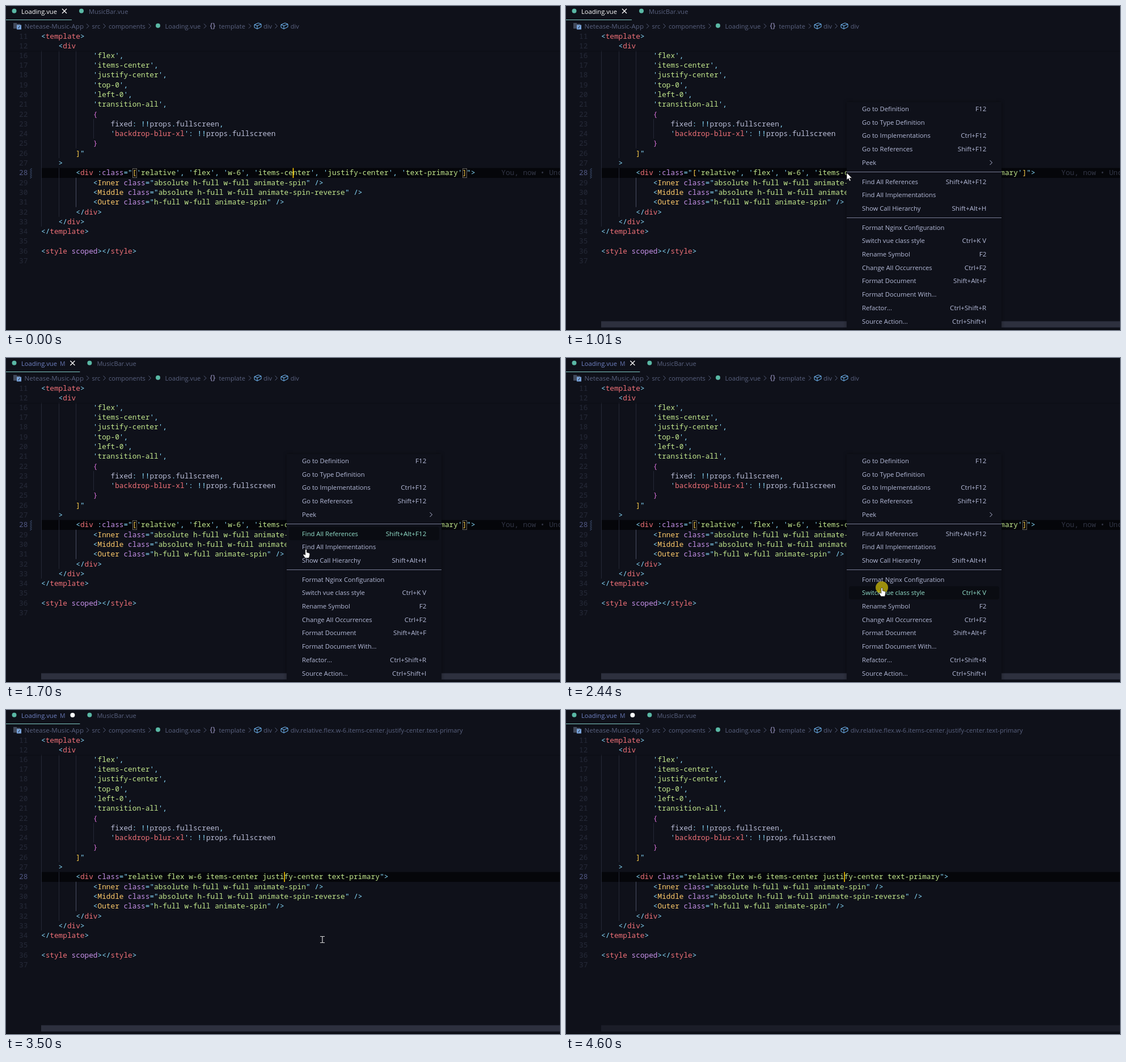
These frames come from a looping animation (977 px wide and 573 px high, 4.66 s). An HTML page with a canvas:

```html
<!DOCTYPE html>
<html lang="en">
<head>
<meta charset="utf-8">
<title>Editor: switch class style</title>
<style>
html, body { margin: 0; width: 100%; height: 100%; overflow: hidden; background: #0f111a; }
canvas { display: block; }
</style>
</head>
<body>
<canvas id="stage" width="977" height="573"></canvas>
<script>
const LOOP = 4660, BG = '#0f111a', CHAR = 7.656, LEFT = 62;
const MONO = '500 12.76px "Noto Sans Mono", "DejaVu Sans Mono", monospace';
const ui = size => `${size}px "Open Sans", "Noto Sans", sans-serif`;
const c = document.getElementById('stage').getContext('2d');

// Key times in ms
const T = { enter: 70, blur: 270, menu: 860, focus: 1220, click: 2430, close: 2500, edit: 2570, dirty: 2640, crumb: 2830 };

// Each piece of a code line starts with a colour key
const INK = { c: '#89ddff', r: '#f07178', p: '#c792ea', g: '#c3e88d', y: '#ffcb6b', w: '#babed8', o: '#ffd04a', m: '#d670d6' };
const quoted = s => `c'~g${s}~c'`;
const item = s => quoted(s) + '~c,';
const tag = (name, cls) => `c<~y${name} ~pclass~c="~g${cls}~c" />`;
const classes = ['relative', 'flex', 'w-6', 'items-center', 'justify-center', 'text-primary'];
const bound = `c<~rdiv ~c:~pclass~c="~o[~${classes.map(quoted).join('~c, ~')}~o]~c">`;
const plain = `c<~rdiv ~pclass~c="~g${classes.join(' ')}~c">`;
const code = [
  [11, 0, 'c<~rtemplate~c>'], [12, 4, 'c<~rdiv'],
  ...['flex', 'items-center', 'justify-center', 'top-0', 'left-0', 'transition-all'].map((s, i) => [16 + i, 12, item(s)]),
  [22, 12, 'm{'],
  [23, 16, 'wfixed~c: !!~wprops~c.~wfullscreen~c,'],
  [24, 16, "c'~rbackdrop-blur-xl~c'~c: !!~wprops~c.~wfullscreen"],
  [25, 12, 'm}'], [26, 8, 'o]~c"'], [27, 4, 'c>'], [28, 8, bound],
  [29, 12, tag('Inner', 'absolute h-full w-full animate-spin')],
  [30, 12, tag('Middle', 'absolute h-full w-full animate-spin-reverse')],
  [31, 12, tag('Outer', 'h-full w-full animate-spin')],
  [32, 8, 'c</~rdiv~c>'], [33, 4, 'c</~rdiv~c>'], [34, 0, 'c</~rtemplate~c>'],
  [35, 0, ''], [36, 0, 'c<~rstyle ~pscoped~c></~rstyle~c>'], [37, 0, '']
];
const lineY = n => n < 13 ? 53.6 + 17.3 * (n - 11) : 87.4 + 17.3 * (n - 16);
const colX = n => LEFT + n * CHAR;

const menu = [
  'Go to Definition|F12', 'Go to Type Definition|', 'Go to Implementations|Ctrl+F12', 'Go to References|Shift+F12', 'Peek|',
  'Find All References|Shift+Alt+F12', 'Find All Implementations|', 'Show Call Hierarchy|Shift+Alt+H',
  'Format Nginx Configuration|', 'Switch vue class style|Ctrl+K V', 'Rename Symbol|F2', 'Change All Occurrences|Ctrl+F2',
  'Format Document|Shift+Alt+F', 'Format Document With...|', 'Refactor...|Ctrl+Shift+R', 'Source Action...|Ctrl+Shift+I'
];
const rowY = i => 182 + 23.7 * i + (i > 4 ? 10 : 0) + (i > 7 ? 10 : 0);

// Pointer path: time, x, y
const path = [
  [60, 850, 585], [270, 650, 430], [410, 530, 310], [540, 497, 289], [730, 497, 289], [860, 495, 293],
  [1150, 495, 296.5], [1270, 495, 297], [1450, 502, 300], [1630, 517, 310], [1700, 529, 337], [1770, 537, 363],
  [1900, 549, 388], [2110, 557, 405], [2430, 557, 405], [2500, 558, 406], [3640, 558, 406], [3850, 690, 455], [4110, 912, 585]
];
function pointer(t) {
  const i = path.findIndex(p => p[0] > t);
  if (i < 1) return path[i < 0 ? path.length - 1 : 0].slice(1);
  const a = path[i - 1], b = path[i], k = (t - a[0]) / (b[0] - a[0]);
  return [a[1] + (b[1] - a[1]) * k, a[2] + (b[2] - a[2]) * k];
}
// The highlight lags slightly behind the pointer
function hoverRow(t) {
  const [x, y] = pointer(t - 42);
  return x < 499 ? -1 : menu.findIndex((_, i) => Math.abs(rowY(i) - y) < 11.9);
}

function rect(x, y, w, h, color) {
  c.fillStyle = color;
  c.fillRect(x, y, w, h);
}
function text(s, x, y, color, font, align = 'left') {
  c.font = font;
  c.fillStyle = color;
  c.textAlign = align;
  c.fillText(s, x, y);
}
function disc(x, y, r, color) {
  c.fillStyle = color;
  c.beginPath();
  c.arc(x, y, r, 0, 7);
  c.fill();
}
function shape(d, x, y, stroke, width = 1, fill) {
  const p = new Path2D(d);
  c.save();
  c.translate(x, y);
  if (fill) { c.fillStyle = fill; c.fill(p); }
  c.strokeStyle = stroke;
  c.lineWidth = width;
  c.lineJoin = 'round';
  c.stroke(p);
  c.restore();
}
const chevron = (x, y, color) => shape('M-2-4L2 0L-2 4', x, y, color);

function header(t) {
  const modified = t >= T.focus, dx = modified ? 14.4 : 0;
  disc(14.5, 8.8, 4, '#5ab8a5');
  text('Loading.vue', 27, 14, modified ? '#7082c4' : '#fff', ui(11.15));
  if (modified) text('M', 95, 14, '#6474b0', ui(10.5));
  if (t >= T.dirty) disc(117.4, 9, 4, '#fff');
  else shape('M-4-4L4 4M4-4L-4 4', 103 + dx, 9, '#fff', 1.3);
  disc(133 + dx, 8.8, 4, '#5ab8a5');
  text('MusicBar.vue', 146 + dx, 14, '#59617f', ui(11.05));
  rect(0, 24, 116 + dx, 1, '#80cbc4');

  const gray = '#59617f', crumb = (s, x, size = 11.1) => text(s, x, 39.5, gray, ui(size));
  rect(13, 30, 6, 3, '#424a5c');
  rect(13, 31.5, 12, 8.5, '#424a5c');
  rect(19, 33.5, 8, 8, '#7aa5dc');
  shape('M-1 2L2-2', 22.5, 37.5, BG);
  crumb('Netease-Music-App', 32.5, 11.55);
  crumb('src', 151.5);
  crumb('components', 181);
  disc(268, 34.8, 4, '#5ab8a5');
  crumb('Loading.vue', 280.5);
  text('{}', 359.5, 39.3, '#a6a0d0', ui(13));
  crumb('template', 375.5);
  crumb('div', 454);
  crumb(t >= T.crumb ? 'div.' + classes.join('.') : 'div', 501.7);
  for (const x of [144, 173.5, 253.5, 351, 430, 476.5]) chevron(x, 35.5, gray);
  for (const x of [444, 491]) shape('M-6-2L1-5L6-3V2L-1 5.5L-6 3ZM-6-2L-1 0L6-3M-1 0V5.5', x, 35, '#75bfff');
}

function guide(col, from, to, color = '#242836') {
  rect(Math.round(colX(col)), lineY(from) - 8.6, 1, 17.3 * (to - from + 1), color);
}

function editor(t) {
  const edited = t >= T.edit;
  rect(LEFT, 286.5, 915, 17.5, '#05060a');
  guide(0, 16, 33);
  guide(4, 16, 26);
  guide(4, 28, 32);
  guide(8, 16, 25);
  guide(12, 23, 24);
  guide(8, 29, 31, '#494e62');
  rect(0, 79.5, 977, 1, '#0c0e15');

  for (const [n, indent, src] of code) {
    const y = lineY(n) + 4.3;
    let col = indent;
    text(n, 38.3, y, n === 28 ? '#525985' : '#262a39', MONO, 'right');
    for (const part of (n === 28 && edited ? plain : src).split('~')) {
      text(part.slice(1), colX(col), y, INK[part[0]], MONO);
      col += Math.max(0, part.length - 1);
    }
  }

  if (!edited) {
    text('You, now • Uncommitted changes', 873.5, 299.3, '#323646', MONO);
    for (let y = 287; y < 303; y += 3) shape('M0 3L3 0', 42.5, y, '#4f6794');
    if (t < T.blur || t >= T.focus) {
      c.strokeStyle = '#66635c';
      c.lineWidth = 1;
      for (const col of [21, 97]) c.strokeRect(Math.round(colX(col)) + .5, 287.5, 7, 16);
    }
  }
  const caretOff = edited ? (t >= 3095 && t < 3495) || (t >= 3900 && t < 4525) : t >= T.blur && t < T.focus;
  if (!caretOff) rect(edited ? 490.3 : 505.7, 286.5, 1.6, 17.5, '#ffcc00');

  c.globalAlpha = Math.max(0, Math.min(1, (t - T.enter) / 100, t < 4525 ? 1 : 1 - (t - 4500) / 170));
  rect(LEFT, 557.5, 915, 11, '#2d303e');
  c.globalAlpha = 1;
  rect(0, 571.5, 977, 1.5, '#090b10');
}

function contextMenu(t) {
  c.save();
  c.shadowColor = '#0006';
  c.shadowBlur = 6;
  rect(495, 170, 273, 401, BG);
  c.restore();
  const hover = hoverRow(t);
  menu.forEach((entry, i) => {
    const [label, keys] = entry.split('|'), y = rowY(i);
    const color = i === hover ? '#92dfca' : '#b6bcda';
    if (i === hover) {
      c.fillStyle = '#0a0c12';
      c.beginPath();
      c.roundRect(499, y - 11.9, 265, 23.7, 4);
      c.fill();
    }
    text(label, 522, y + 4, color, ui(11.24));
    text(keys, 741.3, y + 4, color, ui(11.65), 'right');
  });
  chevron(749.5, 277, '#b6bcda');
  for (const y of [293, 374]) rect(495, y, 273, 1, '#777c94');
}

function drawPointer(t, menuOpen) {
  const [x, y] = pointer(t);
  if (t >= T.click && t < 2640) disc(557, 406, 11, `rgba(212,192,8,${.72 * Math.min(1, (2640 - t) / 140)})`);
  if (!menuOpen) {
    if (t >= T.enter) shape('M-4-5.5H-1L0-5L1-5.5H4M0-5V5M-4 5.5H-1L0 5L1 5.5H4', x, y, '#d8d8d8', 1.2);
  } else if (hoverRow(t) < 0) {
    shape('M0 0V13L3 10.3L5 15L7.3 14L5.3 9.5H9.5Z', x, y, '#111', .8, '#fff');
  } else {
    shape('M-1.4 1Q0-1 1.3 1V5.5L5 6.3Q7 7 6.7 9L6 12.5L5 15.5H-1.5L-5 10.5Q-5.5 8.3-3.5 8.8L-1.4 10Z', x, y + 1, '#111', .7, '#fff');
  }
}

function frame(now) {
  const t = now % LOOP;
  const menuOpen = t >= T.menu && t < T.close;
  rect(0, 0, 977, 573, BG);
  header(t);
  editor(t);
  if (menuOpen) contextMenu(t);
  drawPointer(t, menuOpen);
}

const start = performance.now();
function tick() {
  frame(performance.now() - start);
  requestAnimationFrame(tick);
}
tick();
</script>
</body>
</html>
```
